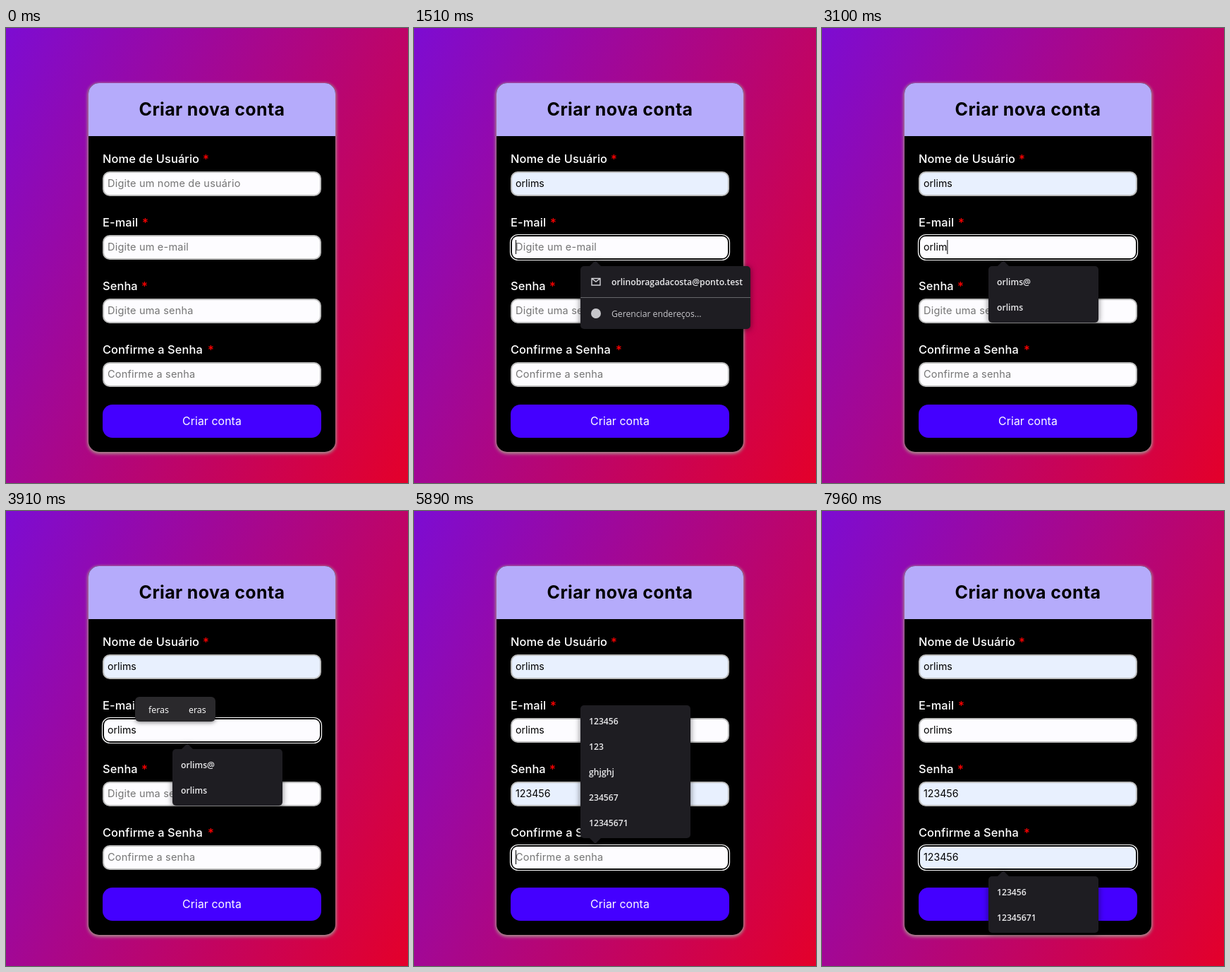
Animation of 570 by 644 pixels, one loop 8 s. Source, as an HTML page:

```html
<!DOCTYPE html>
<html lang="pt-BR">
<head>
<meta charset="utf-8">
<title>Criar nova conta</title>
<style>
  html, body { margin: 0; height: 100%; overflow: hidden; }
  body { background: linear-gradient(117deg, #7d0cd2, #e4002a); }
  svg { display: block; width: 570px; height: 644px; }
  text { font-family: Inter, sans-serif; }
  .title { font-size: 25px; font-weight: 700; letter-spacing: .35px; text-anchor: middle; }
  .label { font-size: 16.4px; font-weight: 450; letter-spacing: .1px; fill: #fff; }
  .star { font-size: 17px; font-weight: 500; fill: #f00; }
  .hint { font-size: 14.5px; letter-spacing: .2px; fill: #757575; }
  .value { font-size: 14.2px; }
  .preview { font: 13.33px "Liberation Sans", Arial, sans-serif; }
  .button { font-size: 15.8px; letter-spacing: .1px; fill: #fff; text-anchor: middle; }
  .item { font: 600 12.2px "Open Sans", sans-serif; fill: #eaeaec; }
  .dim { font: 500 12.2px "Open Sans", sans-serif; fill: #c6c6ca; }
  .word { font: 400 12.5px "Open Sans", sans-serif; fill: #fff; }
  .popup { fill: #1e1d22; filter: drop-shadow(0 1px 4px #0008); }
  .bar { fill: #2a292c; filter: drop-shadow(0 1px 3px #0008); }
  .line { fill: none; stroke: #d2d2d6; stroke-width: 1.4; }
</style>
</head>
<body>
<svg viewBox="0 0 570 644">
  <rect x="117" y="78" width="350" height="522" rx="15" style="filter:drop-shadow(0 1px 2px #a8848c) drop-shadow(0 1px 2px #a8848c)"/>
  <path d="M117 153V93a15 15 0 0 1 15-15H452a15 15 0 0 1 15 15V153Z" fill="#b5abfb"/>
  <text class="title" x="292" y="124">Criar nova conta</text>
  <rect x="137" y="533" width="310" height="47" rx="14" fill="#4400ff"/>
  <text class="button" x="292" y="562">Criar conta</text>
  <g id="form"></g>
</svg>
<script>
const form = document.getElementById('form');
const fields = [
  ['Nome de Usuário', 'Digite um nome de usuário', 279],
  ['E-mail', 'Digite um e-mail', 193],
  ['Senha', 'Digite uma senha', 192],
  ['Confirme a Senha', 'Confirme a senha', 286]
];
const user = 'orlims', mail = 'orlinobragadacosta@ponto.test';

const start = { values: ['', '', '', ''], filled: [], focus: -1, popup: null, hot: -1, caret: false, bar: null };
const type = (s, text) => s.values.map((v, i) => i === s.focus ? text : v);
const key = text => s => ({ values: type(s, text), caret: true });
const hover = i => () => ({ hot: i, caret: false });
const pick = s => ({ values: type(s, s.popup[s.hot]), filled: [...s.filled, s.focus], popup: null, hot: -1, caret: false });
const open = (i, popup) => () => ({ focus: i, popup, hot: -1, caret: true, bar: null });
const set = patch => () => patch;

// Each step changes the form at its time in ms.
const steps = [
  [430, open(0, [mail, user, 'orlinobragadacosta@recadom...', 'recado@ponto.test', 'Orlino'])],
  [950, hover(0)], [990, hover(1)],
  [1460, pick],
  [1510, open(1, 'address')],
  [1850, key(user.slice(0, 1))],
  [2060, key(user.slice(0, 2))],
  [2200, set({ bar: [158, 208, [['efetuei', 177], ['efetuar', 247], ['efeito', 318]]] })],
  [2280, key(user.slice(0, 3))],
  [2370, key(user.slice(0, 4))],
  [2400, set({ bar: null })],
  [2580, set({ bar: [166, 171, [['era', 185], ['fera', 232], ['feira', 284]]] })],
  [2880, set({ caret: false })],
  [3050, key(user.slice(0, 5))],
  [3090, set({ bar: null, popup: [user + '@', user] })],
  [3350, key(user)],
  [3570, set({ bar: [183, 114, [['feras', 202], ['eras', 259]]] })],
  [3910, set({ caret: false })],
  [4090, open(2, ['123456', '123', '12345671', 'ghjh'])],
  [4650, hover(1)], [4900, hover(0)],
  [5120, set({ caret: true })],
  [5420, pick],
  [5810, open(3, ['123456', '123', 'ghjghj', '234567', '12345671'])],
  [6320, hover(4)], [6400, hover(3)], [6460, hover(2)], [6530, hover(1)], [6750, hover(0)],
  [7480, pick],
  [7960, set({ popup: ['123456', '12345671'] })]
];
const states = [[0, start]];
for (const [time, change] of steps) {
  const last = states[states.length - 1][1];
  states.push([time, { ...last, ...change(last) }]);
}

const text = (cls, x, y, str) => `<text class="${cls}" x="${x}" y="${y}">${str}</text>`;
const box = (x, y, w, h, r, attrs) => `<rect x="${x}" y="${y}" width="${w}" height="${h}" rx="${r}" ${attrs}/>`;

function drawField(s, i) {
  const y = 203 + 90 * i, [label, hint, starX] = fields[i];
  const focused = i === s.focus, preview = focused && s.hot >= 0;
  const value = preview ? s.popup[s.hot] : s.values[i];
  const fill = preview || s.filled.includes(i) ? '#e8f0fe' : '#fdfcff';
  let out = text('label', 137, y - 12, label) + text('star', starX, y - 11, '*');
  if (focused) out += box(136.5, y - .5, 311, 36, 11, 'fill="#000" stroke="#fff" stroke-width="1.2"')
    + box(139, y + 2, 306, 31, 8, `fill="${fill}"`);
  else out += box(138, y + 1, 308, 33, 9, `fill="${fill}" stroke="#bbb" stroke-width="2"`);
  const cls = preview ? 'preview' : value ? 'value' : 'hint';
  return out + `<g${focused ? ' id="active"' : ''}>${text(cls, 144, y + 22, value || hint)}</g>`;
}

function drawPopup({ popup, focus, hot }) {
  if (!popup) return '';
  const address = popup === 'address', above = popup.length === 5 && focus === 3;
  const h = address ? 89 : popup.length * 36 + 8;
  const w = address ? 241 : focus === 0 ? 238 : 156;
  const y = above ? 275 : 247 + 90 * focus;
  const arrow = above ? `M249 ${y + h}l8 8 8-8Z` : `M249 ${y}l8-8 8 8Z`;
  let out = `<g class="popup">${box(236, y, w, h, 5, '')}<path d="${arrow}"/></g>`;
  if (address) return out
    + `<path class="line" d="M252 ${y + 17.5}h12v9.5h-12Zl6 4.5 6-4.5"/>` + text('item', 280, y + 27, mail)
    + `<path d="M236 ${y + 44.5}h${w}" stroke="#66666a"/>`
    + `<circle cx="258" cy="${y + 67}" r="7" fill="#c6c6ca"/>` + text('dim', 280, y + 72, 'Gerenciar endereços...');
  popup.forEach((item, i) => {
    const mid = y + 22 + 36 * i;
    if (i === hot) out += box(240, mid - 18, w - 8, 36, 4, 'fill="#353438"')
      + `<path class="line" d="M${w + 210} ${mid - 4}l8 8m0-8l-8 8"/>`;
    out += text('item', 248, mid + 5, item);
  });
  return out;
}

function drawBar(bar) {
  if (!bar) return '';
  const [x, w, words] = bar;
  return box(x, 263, w, 35, 6, 'class="bar"') + words.map(([word, wx]) => text('word', wx, 286, word)).join('');
}

function draw(s) {
  form.innerHTML = fields.map((_, i) => drawField(s, i)).join('') + '<g id="caret"></g>' + drawPopup(s) + drawBar(s.bar);
  if (!s.caret) return;
  const typed = s.hot < 0 && s.values[s.focus];
  const x = 144.5 + (typed ? document.querySelector('#active text').getComputedTextLength() : 0);
  document.getElementById('caret').innerHTML = `<path d="M${x} ${210 + 90 * s.focus}v20" stroke="#000"/>`;
}

let shown;
function tick() {
  const t = performance.now() % 8000;
  const now = states.filter(([time]) => time <= t).pop()[1];
  if (now !== shown) draw(shown = now);
  requestAnimationFrame(tick);
}
tick();
</script>
</body>
</html>
```
